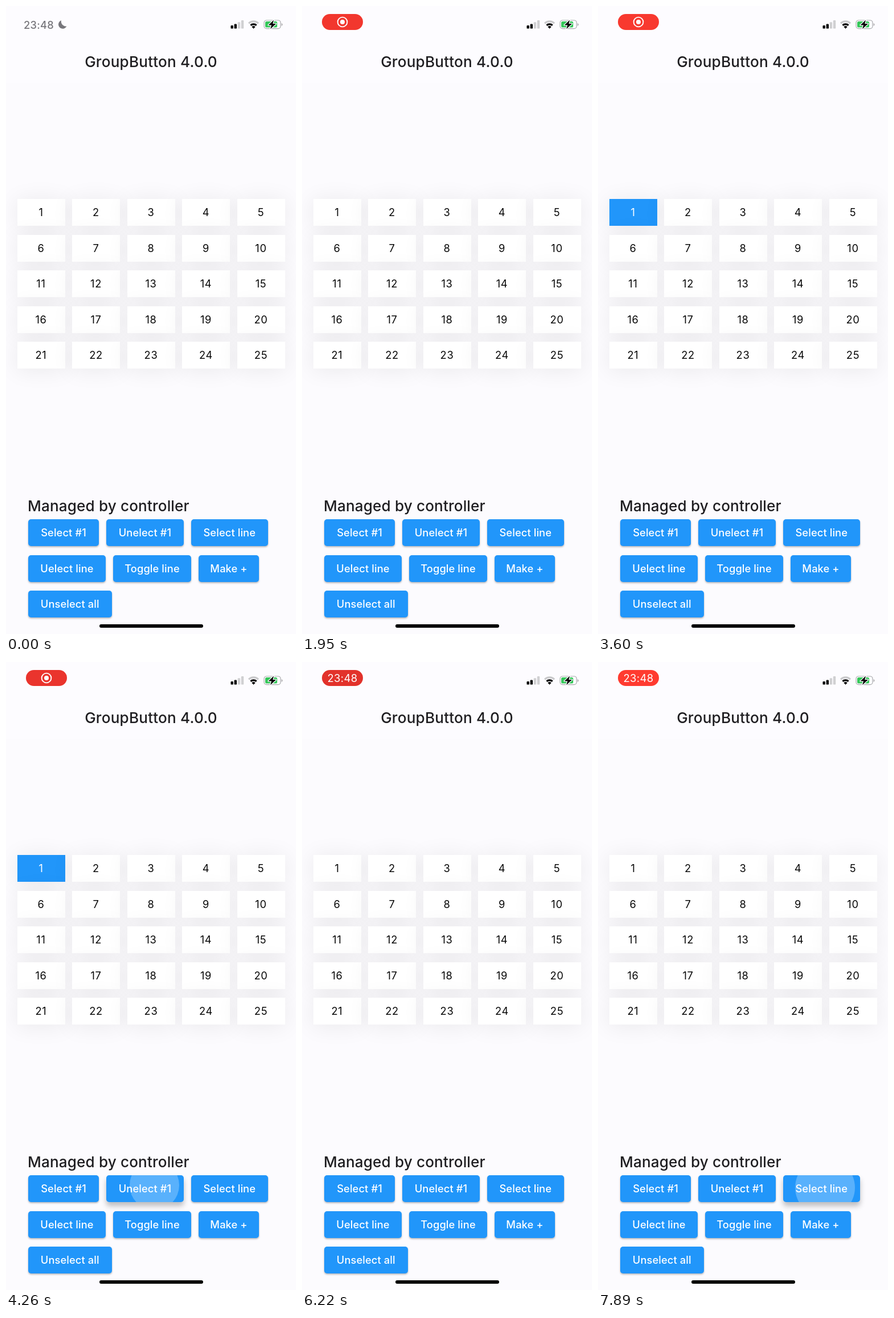
Animation, 509 px wide and 1100 px high, one loop 7.99 s. Source, as an HTML page:

```html
<!DOCTYPE html>
<html lang="en">
<head>
<meta charset="utf-8">
<title>GroupButton</title>
<style>
html, body { margin: 0; width: 100%; height: 100%; overflow: hidden; background: #fcfbfe; }
body { position: relative; font: 500 18.3px/40px Inter, "Open Sans", sans-serif; color: #1f1e21; }
div, svg { position: absolute; white-space: nowrap; }
.bar { left: 0; top: 0; width: 509px; height: 134px; background: #fdfcff; }
.head { font-size: 26.1px; letter-spacing: .15px; }
.title { left: 0; width: 509px; top: 78px; text-align: center; letter-spacing: .22px; }
.cell { width: 84px; height: 47px; background: #fff; color: #080808; text-align: center;
  font-weight: 400; line-height: 47px; letter-spacing: .7px;
  box-shadow: 0 2.6px 39px 1.3px rgba(18,18,18,.07); }
.cell.on { background: #2196fa; color: #fff; }
.btn { height: 47px; border-radius: 5px; background: #2196fa; color: #fff; text-align: center;
  line-height: 47px; letter-spacing: .1px; overflow: hidden; }
.btn span { position: relative; }
.ink { border-radius: 50%; background: #fff; }
.pill { left: 35px; top: 14px; width: 72px; height: 28px; border-radius: 14px; }
.pill div { left: 0; width: 72px; text-align: center; color: #fff; line-height: 28px;
  font-size: 18.5px; font-weight: 400; letter-spacing: .3px; }
.home { left: 164px; top: 1083px; width: 181.5px; height: 6px; border-radius: 3px; background: #000; }
</style>
</head>
<body>
<div class="bar"></div>
<div class="head title">GroupButton 4.0.0</div>
<div id="clock" style="left:31px;top:12.5px;color:#77767b;letter-spacing:.25px">23:48
  <svg style="left:60px;top:11.5px" width="18" height="18" viewBox="91 24 18 18">
    <path fill="#77767b" d="M97 25.2A7.5 7.5 0 1 0 106.3 35.5A8.5 8.5 0 0 1 97 25.2"/>
  </svg>
</div>
<div class="pill" id="pill">
  <svg id="rec" width="72" height="28">
    <circle cx="36" cy="14" r="8.4" fill="none" stroke="#fff" stroke-width="1.9"/>
    <circle cx="36" cy="14" r="4" fill="#fff"/>
  </svg>
  <div id="time">23:48</div>
</div>
<svg width="509" height="60" style="left:0;top:0">
  <g fill="#000">
    <rect x="394.5" y="34" width="4.4" height="5.6" rx="1.2"/>
    <rect x="400.6" y="31.6" width="4.4" height="8" rx="1.2"/>
  </g>
  <g fill="#d0d0d2">
    <rect x="406.7" y="28.3" width="4.4" height="11.3" rx="1.2"/>
    <rect x="412.8" y="25" width="4.4" height="14.6" rx="1.2"/>
  </g>
  <g fill="none" stroke="#000" stroke-width="3.2">
    <path stroke="#c9c9cb" d="M426 30.3A12.4 12.4 0 0 1 443 30.3"/>
    <path d="M429.4 33.9A7.5 7.5 0 0 1 439.6 33.9"/>
  </g>
  <path d="M434.5 39.8L431.4 36.4A4.4 4.4 0 0 1 437.6 36.4Z"/>
  <rect x="453" y="25" width="29" height="14.6" rx="4.4" fill="none" stroke="#a9a9ac" stroke-width="1.2"/>
  <path d="M483.6 30v5a2.6 2.6 0 0 0 0-5" fill="#a9a9ac"/>
  <rect x="455" y="27" width="21" height="10.6" rx="2.6" fill="#34c759"/>
  <path d="M470 24.6L460.5 33.5H466L464 40.2L474 31H468.2Z" stroke="#fdfcff" stroke-width="2.4"
    paint-order="stroke" stroke-linejoin="round"/>
</svg>
<div class="head" style="left:38px;top:856px">Managed by controller</div>
<div class="home"></div>
<script>
const LOOP = 7990;
const $ = id => document.getElementById(id);
const clamp = x => Math.min(1, Math.max(0, x));
const ramp = (t, from, length) => clamp((t - from) / length);

function add(parent, cls, x, y, html = '') {
  const el = document.createElement('div');
  el.className = cls;
  el.style.left = x + 'px';
  el.style.top = y + 'px';
  el.innerHTML = html;
  parent.append(el);
  return el;
}

const cells = Array.from({ length: 25 }, (_, i) =>
  add(document.body, 'cell', 19.5 + i % 5 * 96.5, 338 + Math.floor(i / 5) * 62.6, i + 1));

const buttons = [
  ['Select #1', 39, 0, 124], ['Unelect #1', 176, 0, 136], ['Select line', 325, 0, 134.5],
  ['Uelect line', 39, 1, 136], ['Toggle line', 188, 1, 137], ['Make +', 338, 1, 106],
  ['Unselect all', 39, 2, 146.5]
].map(([label, x, row, w]) => {
  const el = add(document.body, 'btn', x, 899.3 + row * 62.5);
  el.style.width = w + 'px';
  const ink = add(el, 'ink', 0, 0);
  el.insertAdjacentHTML('beforeend', `<span>${label}</span>`);
  return { el, ink, w };
});

// Touches: x, y are relative to the button
const taps = [
  { button: 0, x: 70, y: 20, down: 2350, up: 2640 },
  { button: 1, x: 95, y: 13, down: 4020, up: 5180 },
  { button: 2, x: 82, y: 18, down: 7570, up: 9000 }
];

// CSS "ease": cubic-bezier(.25, .1, .25, 1)
function ease(x) {
  let lo = 0, hi = 1, s;
  for (let i = 0; i < 18; i++) {
    s = (lo + hi) / 2;
    const bx = .75 * s * (1 - s) ** 2 + .75 * s * s * (1 - s) + s ** 3;
    if (bx < x) lo = s; else hi = s;
  }
  return .3 * s * (1 - s) ** 2 + 3 * s * s * (1 - s) + s ** 3;
}

function drawButton({ el, ink, w }, tap, t) {
  let lift = 0, alpha = 0;
  if (tap) {
    const { x, y, down, up } = tap;
    lift = ramp(t, down, 200) * (1 - ramp(t, up, 200));
    alpha = .25 * ramp(t, down, 75) * (1 - ramp(t, up + 225, 150));
    const held = ease(ramp(Math.min(t, up), down, 1000));
    const grow = held + (1 - held) * ramp(t, up, 225);
    const full = Math.hypot(w, 47) / 2;
    const r = full * .3 + (full * .7 + 6.5) * grow;
    const cx = x + (w / 2 - x) * grow, cy = y + (23.5 - y) * grow;
    ink.style.left = cx - r + 'px';
    ink.style.top = cy - r + 'px';
    ink.style.width = ink.style.height = 2 * r + 'px';
  }
  ink.style.opacity = alpha;
  el.style.boxShadow = `0 ${1.8 + 5 * lift}px ${3 + 7 * lift}px rgba(0,0,0,${.28 - .03 * lift})`;
}

function draw(t) {
  const shown = ramp(t, 300, 300), swap = ramp(t, 5500, 250);
  const glow = .5 + .5 * Math.cos((t - 2920) / 4970 * 2 * Math.PI);
  const mix = (a, b) => a + (b - a) * glow;
  $('clock').style.opacity = 1 - shown;
  $('pill').style.opacity = shown;
  $('pill').style.background = `rgb(${mix(217, 255)},${mix(47, 59)},${mix(42, 48)})`;
  $('rec').style.opacity = 1 - swap;
  $('time').style.opacity = swap;
  cells[0].classList.toggle('on', t >= taps[0].up && t < taps[1].up);
  buttons.forEach((b, i) => drawButton(b, taps.find(p => p.button === i), t));
}

const start = performance.now();
function tick() {
  draw((performance.now() - start) % LOOP);
  requestAnimationFrame(tick);
}
tick();
</script>
</body>
</html>
```
